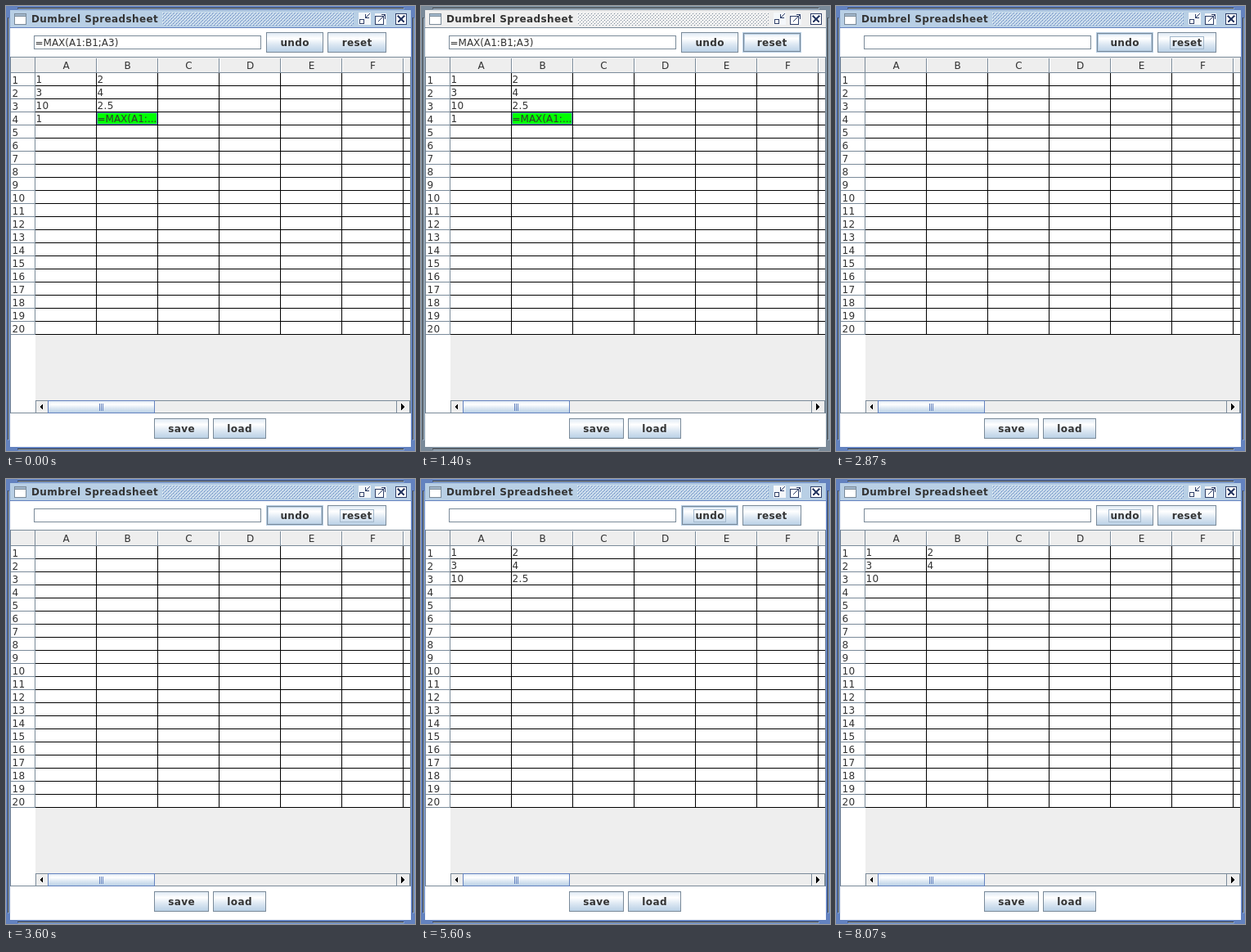
Animation of 500x544 px, one loop 8140 ms. Source, as an HTML page:

```html
<!DOCTYPE html>
<html lang="en">
<head>
<meta charset="utf-8">
<title>Spreadsheet</title>
<style>
html, body { margin: 0; width: 100%; height: 100%; overflow: hidden; background: #fff; }
svg { display: block; width: 500px; height: 544px; shape-rendering: crispEdges; }
text { font: 12px "DejaVu Sans", Verdana, sans-serif; fill: #333; white-space: pre; }
.num { letter-spacing: .37px; }
.bold { font-weight: bold; letter-spacing: .4px; }

.idle, .entry, .data, .b3, .a4, .b4, .resetHover, .resetFocus, .undoHover, .undoFocus {
  animation: 8.14s step-end infinite;
}
.idle { animation-name: idle; }
.entry { animation-name: entry; }
.data { animation-name: data; }
.b3 { animation-name: b3; }
.a4 { animation-name: a4; }
.b4 { animation-name: b4; }
.resetHover { animation-name: resetHover; }
.resetFocus { animation-name: resetFocus; }
.undoHover { animation-name: undoHover; }
.undoFocus { animation-name: undoFocus; }

/* reset confirmed at 29.5%, undo clicks at 48.3%, 57.4%, 65.5% and 74.6% */
@keyframes idle { 0% { opacity: 0 } 7.4% { opacity: 1 } 29.5%, 100% { opacity: 0 } }
@keyframes entry { 0% { opacity: 1 } 29.5%, 100% { opacity: 0 } }
@keyframes data { 0% { opacity: 1 } 29.5% { opacity: 0 } 48.3%, 100% { opacity: 1 } }
@keyframes b3 { 0% { opacity: 1 } 29.5% { opacity: 0 } 48.3% { opacity: 1 } 74.6%, 100% { opacity: 0 } }
@keyframes a4 { 0% { opacity: 1 } 29.5% { opacity: 0 } 48.3% { opacity: 1 } 65.5%, 100% { opacity: 0 } }
@keyframes b4 { 0% { opacity: 0 } 48.3% { opacity: 1 } 57.4%, 100% { opacity: 0 } }
@keyframes resetHover { 0% { opacity: 0 } 4.9% { opacity: 1 } 29.5%, 100% { opacity: 0 } }
@keyframes resetFocus { 0% { opacity: 0 } 29.5% { opacity: 1 } 48.3%, 100% { opacity: 0 } }
@keyframes undoHover { 0% { opacity: 0 } 34.4% { opacity: 1 } 86%, 100% { opacity: 0 } }
@keyframes undoFocus { 0% { opacity: 0 } 48.3%, 100% { opacity: 1 } }
</style>
</head>
<body>
<svg id="stage" viewBox="0 0 500 544" xmlns="http://www.w3.org/2000/svg"></svg>
<script>
const INK = '#333333', NAVY = '#2f3f68', BLUE = '#6382bf', SOFT = '#a3b8cc',
  PALE = '#b8cfe5', EDGE = '#7a8a99', GREY = '#eeeeee', WHITE = '#ffffff';

const rect = (x, y, w, h, fill) =>
  `<rect x="${x}" y="${y}" width="${w}" height="${h}" fill="${fill}"/>`;
const box = (x, y, w, h, stroke, fill = 'none') =>
  `<rect x="${x + .5}" y="${y + .5}" width="${w - 1}" height="${h - 1}" fill="${fill}" stroke="${stroke}"/>`;
const path = (d, stroke, width = 1, fill = 'none') =>
  `<path d="${d}" stroke="${stroke}" stroke-width="${width}" fill="${fill}"/>`;
const text = (s, x, y, cls = '', anchor = 'start') =>
  `<text x="${x}" y="${y}" class="${cls}" text-anchor="${anchor}">${s}</text>`;
const group = (cls, body) => `<g class="${cls}">${body}</g>`;

const bumps = (id, dark) =>
  `<pattern id="${id}" x="191" y="8" width="4" height="4" patternUnits="userSpaceOnUse">` +
  rect(0, 0, 1, 1, WHITE) + rect(2, 2, 1, 1, WHITE) +
  rect(1, 1, 1, 1, dark) + rect(3, 3, 1, 1, dark) + '</pattern>';

const defs = '<defs>' + bumps('bumpsOn', BLUE) + bumps('bumpsOff', EDGE) +
  '<linearGradient id="gloss" x2="0" y2="1"><stop stop-color="#dde8f3"/>' +
  '<stop offset=".3" stop-color="#fff"/><stop offset=".6" stop-color="#dde8f3"/>' +
  `<stop offset="1" stop-color="${PALE}"/></linearGradient></defs>`;

// Window edge with grooves that stop short of the corners
function frame(edge, light, title, pattern) {
  const groove = (d, color, shift) => {
    const from = 14 + shift, across = `H${486 + shift}`, down = `V${530 + shift}`;
    return path(`M${from} ${d + .5}${across}M${d + .5} ${from}${down}` +
      `M${495.5 + d} ${from}${down}M${from} ${539.5 + d}${across}`, color);
  };
  return path('M2.5 2.5H497.5V541.5H2.5Z', edge, 5) +
    groove(3, light, 1) + groove(2, INK, 0) +
    rect(5, 5, 490, 22, title) +
    rect(191, 8, 234, 16, `url(#${pattern})`) +
    rect(5, 26, 490, 1, edge);
}

function titleItems() {
  const icon = box(10, 9, 15, 14, EDGE, WHITE) + rect(11, 10, 13, 2, SOFT) +
    rect(11, 12, 13, 1, EDGE);
  const shrink = rect(431, 8, 15, 15, '#f4f7fa') + box(432, 16, 6, 6, NAVY, WHITE) +
    path('M445 9L440 14M439.5 10V14.5H444', NAVY, 1.3);
  const grow = rect(451, 9, 14, 14, '#f4f7fa') + box(451, 12, 11, 11, NAVY, WHITE) +
    path('M455 19L463 11M458.5 10.5H463.5V15.5', NAVY, 1.4);
  const close = box(476, 9, 14, 14, NAVY, WHITE) +
    path('M479 12L487 20M487 12L479 20', NAVY, 1.6);
  return icon + text('Dumbrel Spreadsheet', 31, 20, 'bold') + shrink + grow + close;
}

const button = (label, x, y, w) => box(x, y, w, 25, EDGE, 'url(#gloss)') +
  text(label, x + w / 2 + .2, y + 17, 'bold', 'middle');

function liveButton(label, x, y, w) {
  const ring = box(x, y, w, 25, PALE) + box(x + 1, y + 1, w - 2, 23, EDGE) +
    box(x + 2, y + 2, w - 4, 21, PALE);
  return button(label, x, y, w) + group(label + 'Hover', ring) +
    group(label + 'Focus', box(x + 15, y + 5, w - 30, 16, SOFT));
}

function sheet() {
  let out = rect(5, 62, 490, 436, EDGE) + rect(6, 63, 488, 434, WHITE) +
    rect(6, 63, 488, 18, GREY) + rect(6, 81, 488, 1, EDGE) +
    rect(36, 402, 458, 80, GREY) + rect(35, 63, 1, 339, EDGE);
  for (let c = 0; c < 6; c++) {
    const x = 110 + c * 75;
    out += rect(x, 64, 1, 17, EDGE) + rect(x + 1, 64, 1, 17, WHITE) +
      rect(x, 82, 1, 320, '#000') +
      text('ABCDEF'[c], x - 36.5, 77, '', 'middle');
  }
  for (let r = 0; r < 20; r++) {
    const y = 97 + r * 16;
    out += rect(6, y, 29, 1, EDGE) + rect(36, y, 458, 1, '#000') +
      text(r + 1, 7.5, y - 2, 'num');
  }
  return out;
}

function scrollbar() {
  let out = rect(36, 482, 458, 15, GREY) + rect(36, 482, 458, 1, EDGE) +
    box(36, 482, 16, 16, EDGE, GREY) + box(477, 482, 17, 16, EDGE, GREY) +
    path('M45 486V494L41 490Z', 'none', 0, '#000') +
    path('M483 486V494L487 490Z', 'none', 0, '#000') +
    box(51, 482, 131, 16, BLUE, 'url(#gloss)');
  for (let x = 114; x < 120; x += 2) out += rect(x, 486, 1, 9, BLUE);
  return out;
}

const cell = (s, col, row) => text(s, 36.5 + col * 75, 94 + row * 16, 'num');

function cells() {
  const kept = [['1', '2'], ['3', '4'], ['10']];
  return group('data', kept.map((row, r) => row.map((s, c) => cell(s, c, r)).join('')).join('')) +
    group('b3', cell('2.5', 1, 2)) +
    group('a4', cell('1', 0, 3)) +
    group('b4', cell('10', 1, 3)) +
    group('entry', box(111, 130, 74, 15, BLUE, '#00ff00') + text('=MAX(A1:...', 111.5, 142) +
      text('=MAX(A1:B1;A3)', 35.5, 49));
}

document.getElementById('stage').innerHTML = defs +
  rect(0, 0, 500, 544, WHITE) +
  frame(BLUE, SOFT, PALE, 'bumpsOn') +
  group('idle', frame(EDGE, PALE, GREY, 'bumpsOff')) +
  titleItems() +
  box(34, 36, 278, 17, EDGE, WHITE) +
  liveButton('undo', 318, 32, 70) + liveButton('reset', 393, 32, 72) +
  sheet() + scrollbar() + cells() +
  button('save', 181, 504, 67) + button('load', 253, 504, 65);
</script>
</body>
</html>
```
